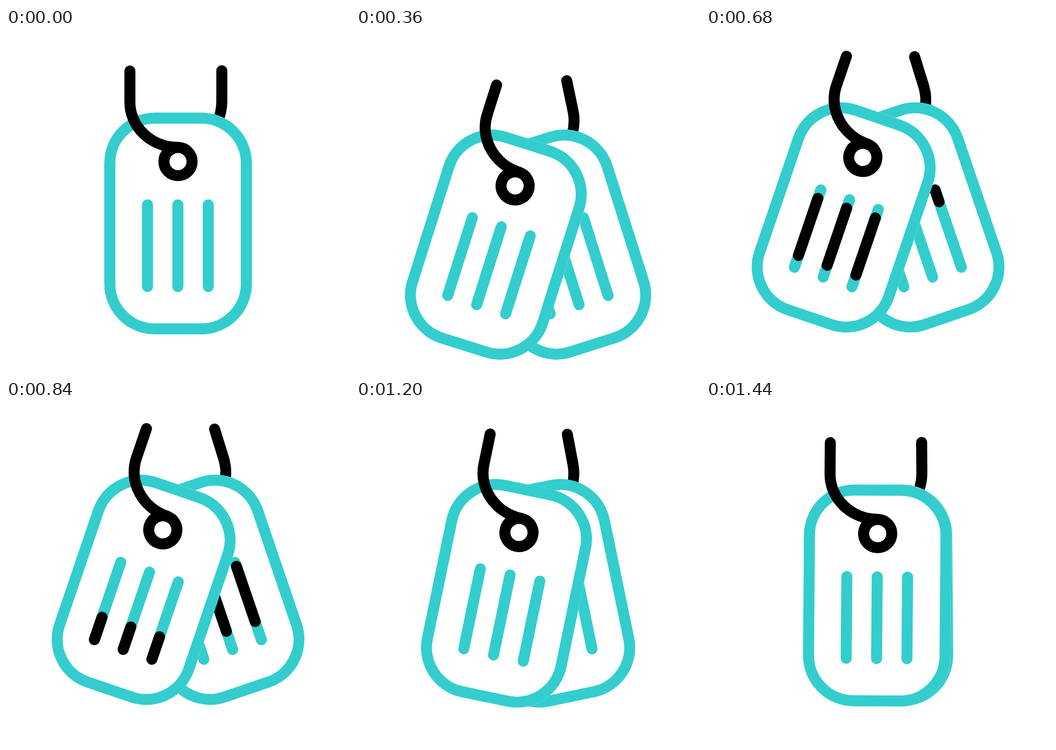
An HTML page for the animation above (1.48 s loop, 640 px wide and 640 px high).

```html
<!DOCTYPE html>
<html lang="en">
<head>
<meta charset="utf-8">
<title>Swinging tags</title>
<style>
  html, body { margin: 0; height: 100%; overflow: hidden; background: #fff; }
  svg { display: block; width: 100%; height: 100%; fill: none; stroke-width: 20.5; stroke-linecap: round; }
  .teal { stroke: #33cdcd; }
  .black { stroke: #000; }
  .plate { fill: #fff; }
</style>
</head>
<body>
<svg viewBox="0 0 640 640">
  <defs>
    <g id="tag">
      <rect class="plate" x="182.9" y="157.5" width="274.5" height="412.5" rx="94.25"/>
      <rect class="teal" x="193.15" y="167.75" width="254" height="392" rx="84"/>
      <path id="bars" class="teal"/>
    </g>
  </defs>
  <path id="backCord" class="black" d="M0 0V57a85.5 87 0 0 1-85.5 87"/>
  <g id="back"><use href="#tag"/><path id="backShine" class="black"/></g>
  <g id="front"><use href="#tag"/><path id="frontShine" class="black"/></g>
  <g id="frontCord" class="black">
    <path d="M0 0V58a89.5 84 0 0 0 89.5 84"/>
    <circle class="plate" cx="89.5" cy="168.5" r="26.2"/>
  </g>
</svg>
<script>
const LOOP = 1480, STEP = 40;
const BAR_TOP = 329, BAR_LENGTH = 152, BAR_GAP = 56.5;

const el = id => document.getElementById(id);
const place = (id, transform) => el(id).setAttribute('transform', transform);

// Eased progress from 0 to 1 between two times
function ramp(t, from, to) {
  const x = Math.min(1, Math.max(0, (t - from) / (to - from)));
  return x * x * (3 - 2 * x);
}

// The three bars, drawn between two fractions of their length
function drawBars(id, start, end) {
  const y = f => BAR_TOP + BAR_LENGTH * f;
  const bar = i => `M${319.8 + i * BAR_GAP} ${y(start)}V${y(end)}`;
  el(id).setAttribute('d', end > start ? [-1, 0, 1].map(bar).join('') : '');
}

function shine(id, t, start) {
  drawBars(id, ramp(t, start + 200, start + 565), ramp(t, start, start + 365));
}

function draw(t) {
  const windup = ramp(t, 55, 200), swing = ramp(t, 200, 440), settle = ramp(t, 440, 600);
  const away = 1 - ramp(t, 995, 1485);
  const move = (a, b, c) => (a * windup + b * swing + c * settle) * away;

  const drop = 48.8 * ramp(t, 65, 375) - 53.6 * ramp(t, 360, 560) + 4.8 * ramp(t, 560, 720);
  const angle = move(-5.85, 31.6, -6.95);
  const frontX = 230.5 + move(-3.5, 46.6, -12.3);
  const frontY = 80 + drop + move(6.2, -38.6, 5.6);
  const backX = 401.5 + move(-6, -4.7, -2.8);
  const backY = 79.5 + drop + move(-9.8, -27.1, 11.4);

  place('front', `translate(0 ${drop}) rotate(${angle} 320 165)`);
  place('back', `translate(0 ${drop}) rotate(${-angle} 320 165)`);
  place('frontCord', `translate(${frontX} ${frontY}) rotate(${angle})`);
  place('backCord', `translate(${backX} ${backY}) rotate(${move(-7.8, -5.5, -3.9)})`);
  shine('frontShine', t, 405);
  shine('backShine', t, 590);
}

const begin = performance.now();
function tick() {
  const t = (performance.now() - begin) % LOOP;
  draw(Math.floor(t / STEP) * STEP);
  requestAnimationFrame(tick);
}
drawBars('bars', 0, 1);
tick();
</script>
</body>
</html>
```
